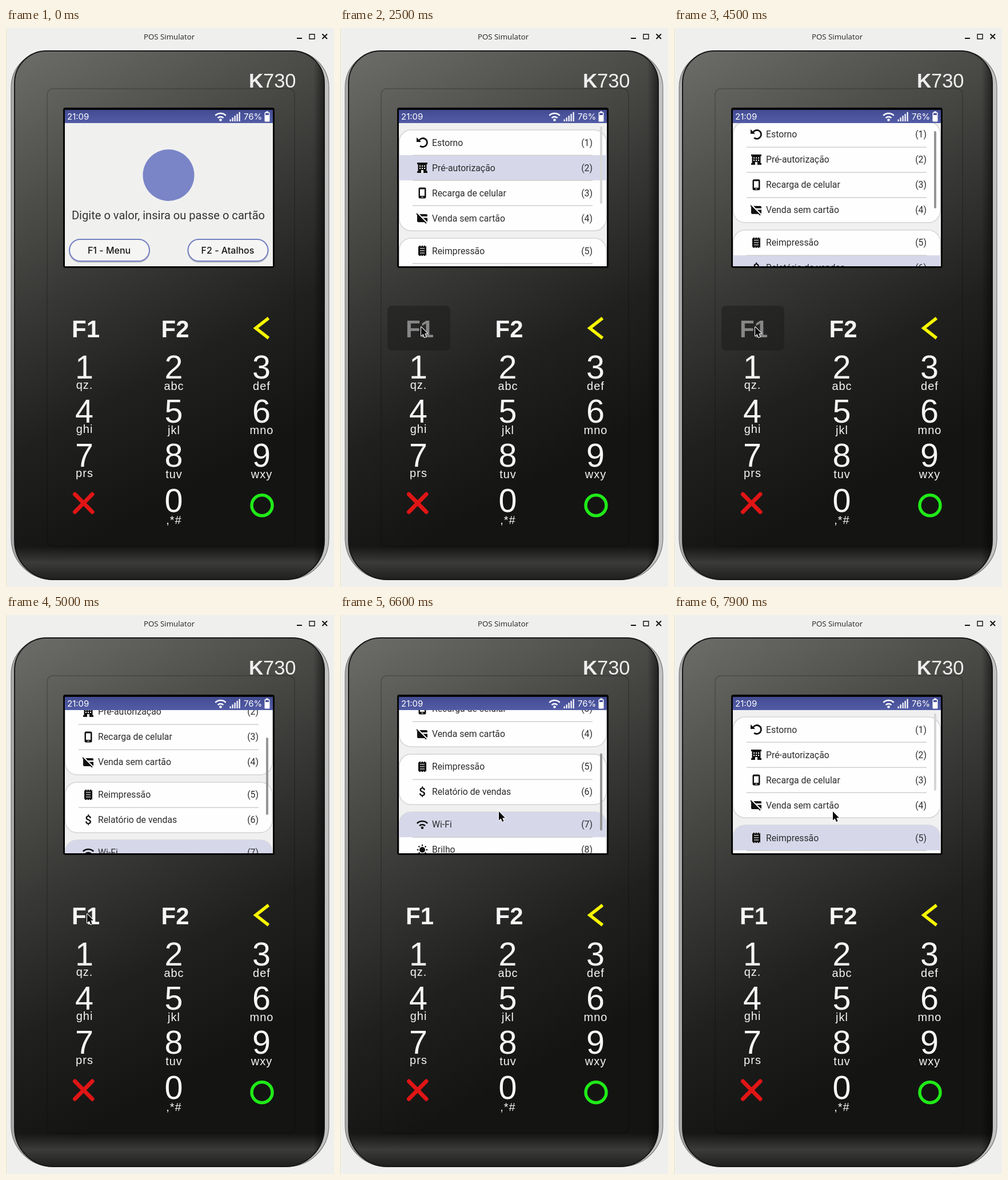
Animation, 574 px wide and 976 px high, one loop 8000 ms. Source, as an HTML page with a canvas:

```html
<!DOCTYPE html>
<html lang="pt">
<head>
<meta charset="utf-8">
<title>POS Simulator</title>
<style>
html, body { margin: 0; width: 574px; height: 976px; overflow: hidden; background: #eff0ee; }
canvas { display: block; }
</style>
</head>
<body>
<canvas id="stage" width="574" height="976"></canvas>
<script>
const c = document.getElementById('stage').getContext('2d');
const LOOP = 8000, ROBOTO = 'Roboto, sans-serif', INTER = 'Inter, sans-serif', ARIAL = '"Liberation Sans", Arial, sans-serif';

// Times and selected row; the first step opens the menu, those before UPWARD are presses of F1.
const STEPS = [[2000, 1], [2480, 2], [2980, 3], [3500, 4], [3980, 5], [4400, 6], [4800, 7], [5200, 8],
  [6500, 7], [6840, 6], [7060, 5]];
const MENU_AT = 2000, UPWARD = 6500, PRESS = 150, GLIDE = 500;
const CURSOR_X = [[500, 580], [1800, 142], [5900, 142], [6300, 278]];
const CURSOR_Y = [[500, 640], [1800, 522], [5900, 522], [6300, 343]];

const ROWS = [[200, 'Estorno'], [244, 'Pré-autorização'], [288, 'Recarga de celular'], [332, 'Venda sem cartão'],
  [389, 'Reimpressão'], [433, 'Relatório de vendas'], [490, 'Wi-Fi'], [534, 'Brilho']];
const CARDS = [[178, 354], [367, 455], [468, 600]];
const TOP = 166, BOTTOM = 416;

const clamp = x => Math.min(1, Math.max(0, x));

function track(keys, t) {
  let v = keys[0][1];
  for (let i = 1; i < keys.length; i++) {
    const [t0, a] = keys[i - 1], [t1, b] = keys[i];
    v += (b - a) * clamp((t - t0) / (t1 - t0));
  }
  return v;
}

// Every step glides from wherever the list is until the selected row is in view.
function menuAt(t) {
  let selected = 0, from = 0, goal = 0, start = 0, stopped = -LOOP;
  const place = now => from + (goal - from) * (1 - (1 - clamp((now - start) / GLIDE)) ** 2);
  for (const [at, row] of STEPS) {
    if (at > t) break;
    from = place(at);
    goal = Math.max(0, ROWS[row - 1][0] + 22 - BOTTOM);
    start = at;
    selected = row;
    if (from !== goal) stopped = at + GLIDE;
  }
  return { selected, scroll: place(t), glow: 1 - clamp((t - stopped - 100) / 250) };
}

function text(s, x, y, font, color, align = 'left') {
  c.font = font; c.fillStyle = color; c.textAlign = align;
  c.fillText(s, x, y);
}
function rect(x, y, w, h, color) { c.fillStyle = color; c.fillRect(x, y, w, h); }
function round(x, y, w, h, r, fill, stroke, width = 1) {
  c.beginPath(); c.roundRect(x, y, w, h, r);
  if (fill) { c.fillStyle = fill; c.fill(); }
  if (stroke) { c.strokeStyle = stroke; c.lineWidth = width; c.stroke(); }
}
function line(points, color, width, cap = 'butt') {
  c.beginPath();
  for (let i = 0; i < points.length; i += 2) c.lineTo(points[i], points[i + 1]);
  c.strokeStyle = color; c.lineWidth = width; c.lineCap = cap; c.stroke();
}
function arc(x, y, r, a, b, color, width) {
  c.beginPath(); c.arc(x, y, r, a * Math.PI, b * Math.PI);
  c.strokeStyle = color; c.lineWidth = width; c.lineCap = 'butt'; c.stroke();
}
function disc(x, y, r, color) { c.beginPath(); c.arc(x, y, r, 0, 7); c.fillStyle = color; c.fill(); }
function gradient(x0, y0, x1, y1, ...colors) {
  const g = c.createLinearGradient(x0, y0, x1, y1);
  colors.forEach((k, i) => g.addColorStop(i / (colors.length - 1), k));
  return g;
}
function wifi(x, y, color) {
  for (const r of [7, 13]) arc(x, y, r, 1.25, 1.75, color, 2.5);
  disc(x, y - 1.5, 2.3, color);
}

// Each icon is drawn around (0, 0).
const INK = '#111';
const ICONS = [
  () => {
    arc(1, 0, 7.5, -0.83, 0.72, INK, 2.8);
    c.beginPath(); c.moveTo(-10, -9); c.lineTo(-10, -1); c.lineTo(-2, -1); c.fillStyle = INK; c.fill();
  },
  () => {
    rect(-9, -9, 18, 3, INK); rect(-7.5, -7, 15, 14, INK); rect(-9, 6, 18, 3, INK);
    for (const y of [-4, 0]) for (const x of [-5, -1, 3]) rect(x, y, 2, 2, '#fff');
    rect(-2, 4, 4, 5, '#fff');
  },
  () => {
    round(-6.5, -9.5, 13, 19, 2.5, INK); rect(-4, -6.5, 8, 11.5, '#fff'); rect(-1.5, 6.5, 3, 1.2, '#fff');
  },
  () => {
    round(-9, -7, 18, 14, 2, INK); rect(-1, -3, 10, 2.5, '#fff');
    line([-9, -9, 9, 9], '#fff', 3); line([-10, -8, 7, 9], INK, 1.8);
  },
  () => {
    rect(-7, -9, 14, 18, INK);
    for (const y of [-5, -1, 3]) rect(-4, y, 8, 1.5, '#bbb');
    for (let x = -7; x < 7; x += 4) { rect(x, -9, 1.5, 1.5, '#fff'); rect(x, 7.5, 1.5, 1.5, '#fff'); }
  },
  () => text('$', 0, 7, '500 21px ' + ROBOTO, INK, 'center'),
  () => wifi(0, 7, INK),
  () => {
    disc(0, 0, 5, INK);
    for (let i = 0; i < 8; i++) {
      const x = Math.cos(i * Math.PI / 4), y = Math.sin(i * Math.PI / 4);
      line([x * 6.5, y * 6.5, x * 9.2, y * 9.2], INK, 2);
    }
  }
];

function drawWindow() {
  rect(0, 0, 574, 976, '#eff0ee');
  rect(0, 0, 1, 976, '#eee3ba');
  text('POS Simulator', 285.5, 19.5, '13.3px "Open Sans", sans-serif', '#222', 'center');
  rect(509, 17, 9, 2, '#111');
  round(531, 11, 9, 8, 0, null, '#111', 1.4);
  line([553.5, 10.5, 562, 19], '#111', 2);
  line([562, 10.5, 553.5, 19], '#111', 2);
}

function drawBody() {
  const corners = [56, 56, 68, 68];
  round(9, 40, 556, 923, [64, 64, 72, 72], gradient(9, 0, 565, 0, '#aaa', '#777', '#c4c4c4'), '#777', 1.2);
  round(15, 40, 542, 923, corners, gradient(20, 60, 400, 760, '#6a6a67', '#50504d', '#373735', '#20201f', '#141413'));
  c.save();
  c.clip();
  rect(15, 905, 542, 57, gradient(0, 905, 0, 962, 'rgba(85,85,82,0)', 'rgba(85,85,82,.6)', 'rgba(40,40,38,.6)'));
  rect(538, 40, 19, 923, gradient(538, 0, 557, 0, 'rgba(0,0,0,0)', 'rgba(0,0,0,.5)'));
  c.restore();
  round(15, 40, 542, 923, corners, null, '#161616', 2);
  round(72, 106, 433, 799, 10, null, 'rgba(0,0,0,.22)', 1.5);
  text('K', 425, 104, '900 35px ' + ARIAL, '#eee');
  text('730', 450, 104, '34.5px ' + ARIAL, '#eee');
}

function drawKeys() {
  const white = '#f6f6f6';
  text('F1', 139.5, 540, 'bold 42px ' + ARIAL, white, 'center');
  text('F2', 296, 540, 'bold 42px ' + ARIAL, white, 'center');
  const labels = ['qz.', 'abc', 'def', 'ghi', 'jkl', 'mno', 'prs', 'tuv', 'wxy'];
  const key = (digit, label, x, y, labelY) => {
    text(digit, x, y, '57.5px ' + ARIAL, white, 'center');
    c.letterSpacing = '1px';
    text(label, x + .5, labelY, '20px ' + ARIAL, white, 'center');
    c.letterSpacing = '0px';
  };
  labels.forEach((label, i) => {
    const col = i % 3, y = 611.5 + 77 * Math.floor(i / 3);
    key(i + 1, label, [137, 293.5, 447][col], y, y + (col ? 20.5 : 18));
  });
  key('0', ',*#', 293.5, 845, 866);
  line([459.5, 506.5, 437, 524, 459.5, 541.5], '#f8f800', 5.5);
  line([120.5, 814, 151, 845], '#e01515', 7, 'round');
  line([151, 814, 120.5, 845], '#e01515', 7, 'round');
  arc(448, 833.5, 18, 0, 2, '#20ea18', 5.5);
}

function drawHome() {
  disc(284.5, 257, 45, '#7a85c8');
  text('Digite o valor, insira ou passe o cartão', 284, 333.5, '20.1px ' + ROBOTO, '#333', 'center');
  for (const [x, label] of [[111, 'F1 - Menu'], [318.5, 'F2 - Atalhos']]) {
    round(x, 370, 140, 39, 19.5, null, 'rgba(0,0,0,.18)', 2);
    round(x, 369, 140, 38, 19, '#f5f5f4', '#7480c2', 2);
    text(label, x + 69.5, 393.5, '500 16px ' + INTER, '#151515', 'center');
  }
}

function drawMenu({ selected, scroll, glow }) {
  c.save();
  c.beginPath(); c.rect(103, TOP, 364, BOTTOM - TOP); c.clip();
  rect(103, TOP, 364, BOTTOM - TOP, '#f0f0f0');
  c.translate(0, -scroll);
  for (const [y0, y1] of CARDS) {
    round(103.5, y0, 362.5, y1 - y0, 21, '#fefefe', '#d4d4d4', 1.5);
    c.save();
    c.clip();
    const y = ROWS[selected - 1][0];
    if (y > y0 && y < y1) rect(103, y - 22, 364, 44, '#d6d8ea');
    for (let edge = y0 + 44; edge < y1; edge += 44) rect(127, edge - .5, 315, 1.5, '#d0d0d0');
    c.restore();
  }
  ROWS.forEach(([y, label], i) => {
    c.save(); c.translate(144, y); ICONS[i](); c.restore();
    text(label, 161, y + 5.5, '15.8px ' + ROBOTO, '#2c2c2c');
    text(`(${i + 1})`, 442, y + 5.5, '15.8px ' + ROBOTO, '#2c2c2c', 'right');
  });
  c.translate(0, scroll);
  const shade = 215 - 65 * glow;
  round(455, 172 + scroll * .56, 4, 135, 2, `rgb(${shade},${shade},${shade})`);
  c.restore();
}

function drawStatus() {
  rect(103, 143, 364, 23, gradient(0, 143, 0, 166, '#434c92', '#525ca6'));
  text('21:09', 107, 160, '15px ' + INTER, '#fff');
  wifi(375.5, 162, '#fff');
  for (let i = 0; i < 5; i++) rect(391.5 + i * 4, 159.5 - i * 3.2, 2.2, 3.5 + i * 3.2, '#fff');
  text('76%', 416, 160, '15px ' + INTER, '#fff');
  rect(455, 145.5, 4, 2, '#fff');
  round(452.5, 147, 9, 16.5, 1.5, '#fff');
  rect(454, 148.5, 6, 3.5, '#4a5399');
}

function drawScreen(t) {
  round(100, 139, 370, 280, 4, '#050505');
  rect(103, 143, 364, 273, '#f0f1ef');
  if (t < MENU_AT) drawHome();
  else drawMenu(menuAt(t));
  drawStatus();
}

function drawCursor(x, y) {
  c.save();
  c.translate(x, y);
  c.beginPath();
  for (const [px, py] of [[0, 0], [0, 15.5], [3.6, 12.3], [6, 18], [8.6, 17], [6.2, 11.4], [10.8, 11]]) c.lineTo(px, py);
  c.closePath();
  c.lineJoin = 'round'; c.lineWidth = 2; c.strokeStyle = '#fff'; c.stroke();
  c.fillStyle = '#0a0a0a'; c.fill();
  c.restore();
}

function frame() {
  const t = performance.now() % LOOP;
  const pressed = STEPS.some(([at]) => at < UPWARD && t >= at && t < at + PRESS);
  drawWindow();
  drawBody();
  drawKeys();
  if (pressed) round(83, 485, 110, 78, 8, 'rgba(26,26,26,.5)');
  drawScreen(t);
  drawCursor(track(CURSOR_X, t), track(CURSOR_Y, t));
  requestAnimationFrame(frame);
}
frame();
</script>
</body>
</html>
```
